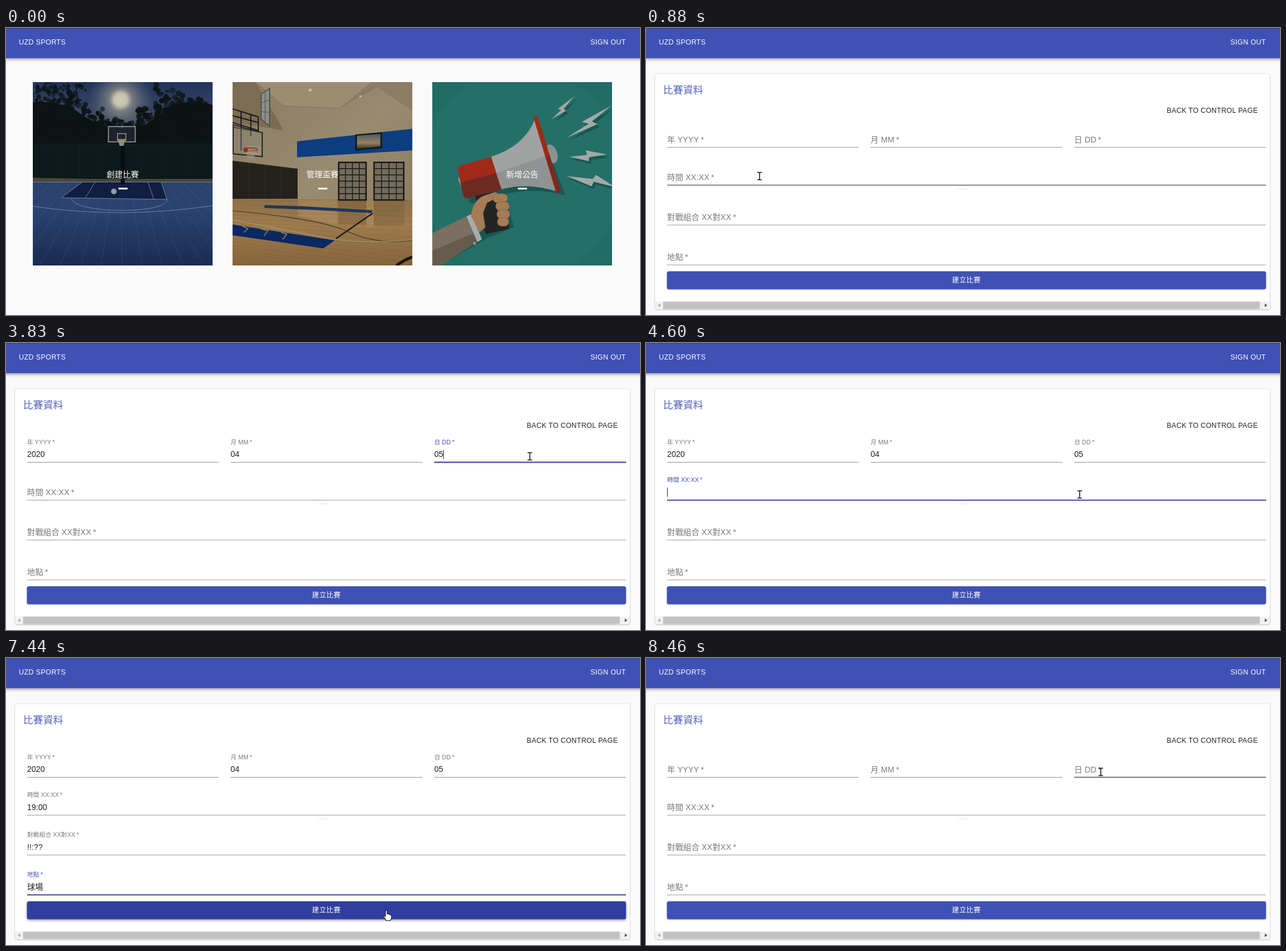
Recreate the animation shown at these times as an HTML page. Size 1111 by 504 pixels, loop 8530 ms.

```html
<!DOCTYPE html>
<html lang="zh-Hant">
<head>
<meta charset="utf-8">
<title>Match form</title>
<style>
html, body { margin: 0; width: 100%; height: 100%; overflow: hidden; background: #fafafa; }
svg { display: block; width: 1111px; height: 504px; }
text { font-family: "Liberation Sans", "Noto Sans CJK TC", "Noto Sans CJK JP", "Noto Sans CJK", sans-serif; font-weight: 300; }
.btn { font-size: 12.25px; letter-spacing: .35px; }
.bar { filter: drop-shadow(0 2px 2px rgba(0,0,0,.28)) drop-shadow(0 1px 4px rgba(0,0,0,.14)); }
.paper { filter: drop-shadow(0 1px 1px rgba(0,0,0,.2)) drop-shadow(0 0 1px rgba(0,0,0,.14)); }
.cap { font-size: 14px; letter-spacing: .13px; fill: #fff; text-anchor: middle; }
</style>
</head>
<body>
<svg viewBox="0 0 1111 504" xmlns="http://www.w3.org/2000/svg">
<defs>
  <clipPath id="c0"><rect x="47" y="95" width="315" height="322"/></clipPath>
  <clipPath id="c1"><rect x="397" y="95" width="315" height="322"/></clipPath>
  <clipPath id="c2"><rect x="747" y="95" width="315" height="322"/></clipPath>
  <linearGradient id="sky" x2="0" y2="1"><stop stop-color="#21345a"/><stop offset=".6" stop-color="#4d586b"/><stop offset="1" stop-color="#3b4149"/></linearGradient>
  <radialGradient id="sun"><stop stop-color="#cfccbb"/><stop offset=".2" stop-color="#c3c0ac"/><stop offset=".36" stop-color="#8a8c88" stop-opacity=".75"/><stop offset="1" stop-color="#566378" stop-opacity="0"/></radialGradient>
  <linearGradient id="court" x2="0" y2="1"><stop stop-color="#2b426c"/><stop offset=".35" stop-color="#2a4271"/><stop offset="1" stop-color="#1a2b52"/></linearGradient>
  <linearGradient id="wall" x2="1" y2="1"><stop stop-color="#887a60"/><stop offset=".5" stop-color="#998b70"/><stop offset="1" stop-color="#85775d"/></linearGradient>
  <linearGradient id="wood" x2="0" y2="1"><stop stop-color="#8f7148"/><stop offset=".4" stop-color="#9c7b4e"/><stop offset="1" stop-color="#85653a"/></linearGradient>
  <linearGradient id="dusk" x2="0" y2="1"><stop stop-color="#4d5a66"/><stop offset=".6" stop-color="#94815f"/><stop offset="1" stop-color="#3c352c"/></linearGradient>
  <g id="bolts">
    <path d="M996 120L967 142L973 144L956 160L982 145L977 142Z"/>
    <path d="M1061 136L1009 165L1021 168L982 193L1036 169L1027 164Z"/>
    <path d="M1053 222L1016 215L1018 223L988 226L1021 234L1022 227Z"/>
    <path d="M983 260L1026 278L1030 270L1062 278V276L1034 258L1028 265Z"/>
  </g>
</defs>
<rect width="1111" height="504" fill="#fafafa"/>

<g id="home">
  <g clip-path="url(#c0)"><g class="pic">
    <rect x="47" y="95" width="315" height="175" fill="url(#sky)"/>
    <circle cx="201" cy="126" r="58" fill="url(#sun)"/>
    <path d="M47 130Q100 128 130 150T201 176T270 150T362 135V210H47Z" fill="#0e1315"/>
    <g id="trees" fill="#0e1315"></g>
    <rect x="47" y="204" width="315" height="62" fill="#0b1a1b"/>
    <path d="M47 204H362M88 204V265M129 204V265M170 204V265M238 204V265M280 204V265M321 204V265" stroke="#102425" fill="none"/>
    <path d="M47 263L150 265H362V270H47Z" fill="#4e4630"/>
    <rect x="47" y="269" width="315" height="148" fill="url(#court)"/>
    <g id="tiles" stroke="#7c8db0" stroke-opacity=".17"></g>
    <path d="M133 271H272L282 301L97 298Z" fill="#101e42"/>
    <g fill="none" stroke="#78849f" stroke-width="1">
      <path d="M47 270.500H362M133 271L97 298L282 301L272 271M156 271L139 298M249 271L259 301"/>
      <path d="M115 299C116 326 282 328 282 301"/>
      <path d="M47 313Q200 336 362 312"/>
    </g>
    <circle cx="189" cy="287" r="5" fill="#9299ab"/>
    <path d="M201 205H208V274H201Z" fill="#080d12"/>
    <rect x="179.500" y="173" width="47" height="27" fill="#3a4456" fill-opacity=".35" stroke="#9b9d9f" stroke-width="1.600"/>
    <rect x="195.500" y="185.500" width="14.500" height="12" fill="none" stroke="#a5a6a6" stroke-width="1.300"/>
    <path d="M196 196H209L206 207H199Z" fill="#8e8d84"/><path d="M196 195.500H209" stroke="#a77440" stroke-width="1.500"/>
  </g></g>

  <g clip-path="url(#c1)"><g class="pic">
    <rect x="397" y="95" width="315" height="322" fill="url(#wall)"/>
    <path d="M397 95H437L487 180L397 165Z" fill="#7b6d54"/>
    <path d="M437 95H712V132L650 104L584 141L487 137Z" fill="#9b8d71"/>
    <path d="M584 141L640 95H712V145L650 104Z" fill="#8b7d63"/>
    <path d="M437 95L487 137L584 141L650 100" fill="none" stroke="#807259"/>
    <circle cx="533" cy="109" r="2.500" fill="#d0c4a4"/><circle cx="621" cy="120" r="2" fill="#c9bc9b"/>
    <path d="M447 116L462 106V172L447 160Z" fill="#85908f" stroke="#5c503d" stroke-width="2"/><path d="M454 111V166M447 132L462 126M447 147L462 148" stroke="#5c503d"/>
    <path d="M510 199L712 177V215L510 227Z" fill="#0b3d80"/>
    <path d="M612 187L659 183V211L612 215Z" fill="#15191c"/><path d="M615 189L656 186V208L615 212Z" fill="url(#dusk)"/>
    <path d="M397 233L511 247V300H397Z" fill="#25211d"/>
    <path d="M425 237V300M453 240V300M482 244V300" stroke="#332e29"/>
    <path d="M397 142L442 156V182L397 174M397 154L442 166M397 166L442 180M412 147V215M429 152V190" fill="none" stroke="#17191c" stroke-width="2"/>
    <path d="M398 170L449 184V226L398 221Z" fill="#8a8878" fill-opacity=".4" stroke="#1b1d20" stroke-width="1.800"/>
    <path d="M424 207L444 209V222L424 219Z" fill="none" stroke="#a9a498"/><ellipse cx="429" cy="213.500" rx="12" ry="3" fill="none" stroke="#a83b20" stroke-width="1.800"/><path d="M418 215L439 216L434 229H424Z" fill="#a39a82" opacity=".6"/><circle cx="420" cy="214" r="4" fill="#9e2d1c"/>
    <path d="M397 300L712 302V417H397Z" fill="url(#wood)"/>
    <g id="doors"></g>
    <path d="M512 302H580V346L512 330ZM632 302H644V350H632Z" fill="#c3a779" opacity=".3"/>
    <path d="M583 303H631V345H583ZM645 303H698V347H645Z" fill="#5b482f" opacity=".22"/>
    <g id="planks" stroke="#5d4423" stroke-opacity=".2" stroke-width=".7"></g>
    <path d="M453 311L520 313L643 320L640 325L530 319L453 316Z" fill="#20365a"/>
    <path d="M397 345L576 373L556 387L397 364Z" fill="#0a2862"/>
    <path d="M414 348L424 352L417 359M447 353L459 356L452 365M482 359L492 362L485 371" fill="none" stroke="#94855b" stroke-width="1.500"/>
    <path d="M578 370L643 325" stroke="#1c1b1a" stroke-width="2.500"/>
    <path d="M397 321Q550 335 600 358T712 373" fill="none" stroke="#3a3023" stroke-width="1.200"/>
    <path d="M397 337L575 371Q632 379 712 372" fill="none" stroke="#a99a78" stroke-width="1.200"/>
    <path d="M684 417Q698 407 712 402" fill="none" stroke="#171512" stroke-width="5"/>
  </g></g>

  <g clip-path="url(#c2)"><g class="pic">
    <rect x="747" y="95" width="315" height="322" fill="#216c65"/>
    <circle cx="905" cy="256" r="181" fill="#246f68"/>
    <path d="M800 252L858 235Q918 216 934 170L980 294Q925 279 874 292L890 350L842 370L760 417H747V395L830 340L834 306L812 308Z" fill="#1a5751"/>
    <use href="#bolts" fill="#1a5751" transform="translate(4 5)"/>
    <use href="#bolts" fill="#a3a9a8"/>
    <ellipse cx="956" cy="221" rx="10" ry="17" transform="rotate(-18 956 221)" fill="#8b9292"/>
    <path d="M796 262L792 265L797 277L801 275Z" fill="#909797"/>
    <path d="M850 226Q908 208 927 160L966 287Q914 271 868 283Z" fill="#a0a2a2"/>
    <path d="M858 255L948 224L966 287Q914 271 868 283Z" fill="#909293"/>
    <path d="M924 156Q928 152 932 156L972 286Q970 291 964 289Z" fill="#a02918"/>
    <path d="M952 222L972 286Q970 291 964 289L946 227Z" fill="#7c2a1f"/>
    <path d="M795 242L850 226L868 283L809 299Q803 299 800 290L792 248Q792 243 795 242Z" fill="#a02918"/>
    <path d="M797 271L858 255L868 283L809 299Q803 299 801 293Z" fill="#6c2a21"/>
    <path d="M822 295L858 287L882 346Q883 352 877 354L840 362Z" fill="#232524"/>
    <path d="M747 360L808 330L832 371L762 417H747Z" fill="#7a6f60"/>
    <path d="M747 391L825 358L832 371L762 417H747Z" fill="#665c4e"/>
    <path d="M807 331L815 327L834 371L826 376Z" fill="#a8acac"/>
    <path d="M815 330Q818 304 836 295L857 288Q866 291 859 299L843 307L836 325L840 350L829 359Z" fill="#a57c56"/>
    <g fill="#a57c56" stroke="#7d5b3c" stroke-width=".6"><rect x="853" y="291" width="26" height="16" rx="8"/><rect x="858" y="305" width="24" height="16" rx="8"/><rect x="860" y="319" width="23" height="16" rx="8"/><rect x="861" y="333" width="20" height="15" rx="7"/></g>
    <circle cx="821" cy="378" r="3.500" fill="#8c8e88" stroke="#4a4a42"/>
  </g></g>
  <g id="caps"></g>
</g>

<g id="form">
  <rect class="paper" x="16" y="81" width="1077" height="413" rx="3.500" fill="#fff"/>
  <text x="30" y="114.500" font-size="17.5" fill="#5261b9">比賽資料</text>
  <text class="btn" x="912.500" y="149.400" fill="#212121">BACK TO CONTROL PAGE</text>
  <rect x="547" y="281" width="16" height="3" fill="#f4f4f4"/>
  <g id="fields"></g>
  <rect id="go" x="36.700" y="427.200" width="1049.800" height="31.600" rx="3.500"/>
  <text class="btn" x="561.500" y="447" fill="#fff" text-anchor="middle">建立比賽</text>
  <rect x="16" y="480.500" width="1077" height="13" fill="#f1f1f1"/>
  <rect x="30" y="480.500" width="1045.500" height="13" fill="#c1c1c1"/>
  <path d="M25 484V490L21 487Z" fill="#a3a3a3"/><path d="M1084.500 484V490L1088.500 487Z" fill="#404040"/>
</g>

<g class="bar"><rect x="-12" y="-3" width="1135" height="56" fill="#3f51b5"/></g>
<rect width="1111" height="1" fill="#313f8e"/>
<text class="btn" x="22.500" y="29.200" fill="#fff">UZD SPORTS</text>
<text class="btn" x="1024.300" y="29.200" fill="#fff">SIGN OUT</text>

<g id="mouse">
  <path d="M-4 -6.500H-1L0 -5.500L1 -6.500H4M0 -5.500V5.500M-4 6.500H-1L0 5.500L1 6.500H4" fill="none" stroke="#111" stroke-width="1.500"/>
  <path d="M-3 -8Q-1.500 -10 0 -8V-2.500Q2 -3.500 3 -1.800Q5 -2.600 5.500 -.800Q7.500 -1 7.500 1V4Q7 7 5.500 9H-2Q-3 6 -6 2.500Q-6.500 0 -4.500 .800L-3 2Z" fill="#fff" stroke="#111" stroke-width="1.100"/>
  <path d="M0 0V15L3.500 11.800L6 17.500L8.300 16.500L5.900 11H10.500Z" fill="#fff" stroke="#111"/>
</g>
</svg>
<script>
const LOOP = 8530, OPEN = 820, SUBMIT = 7440, RESET = 8000;
const BLUE = '#3f51b5';
const $ = id => document.getElementById(id);
const clamp = v => Math.max(0, Math.min(1, v));
const ease = v => 1 - Math.pow(1 - clamp(v), 3);
const smooth = v => v * v * (3 - 2 * v);
const mix = (a, b, v) => a + (b - a) * v;

function add(parent, tag, attrs, text) {
  const el = document.createElementNS('http://www.w3.org/2000/svg', tag);
  set(el, attrs);
  if (text) el.textContent = text;
  return parent.appendChild(el);
}
function set(el, attrs) {
  for (const k in attrs) el.setAttribute(k, attrs[k]);
}

let seed = 7;
const rnd = () => (seed = seed * 16807 % 2147483647) / 2147483647;

function scenery() {
  // foliage: small leaf clumps, thinning out towards the sun and the top
  for (let i = 0; i < 1000; i++) {
    const x = 47 + rnd() * 315;
    const off = Math.abs(x - 201);
    const top = off < 30 ? 160 : off < 60 ? 140 : x < 201 ? 95 : Math.min(150, 98 + (off - 60) * .35);
    const y = mix(top, 200, Math.pow(rnd(), .8));
    add($('trees'), 'circle', { cx: x.toFixed(1), cy: y.toFixed(1), r: (1 + rnd() * 4.5).toFixed(1),
      opacity: (.5 + rnd() * .5).toFixed(2) });
  }
  for (let i = -14; i <= 14; i++)
    add($('tiles'), 'line', { x1: 203 + i * 15, y1: 270, x2: 203 + i * 36, y2: 417 });
  for (let i = 0; i < 20; i++)
    add($('planks'), 'line', { x1: 397, y1: 304 + i * 6, x2: 712, y2: 304 + i * 9 });
  for (const [x, w] of [[583, 48], [645, 52]]) {
    add($('doors'), 'rect', { x, y: 236, width: w, height: 66, fill: '#736c5b', stroke: '#191613', 'stroke-width': 2.5 });
    for (let i = 1; i < 4; i++)
      add($('doors'), 'rect', { x: x + i * w / 4 - .8, y: 236, width: 1.6, height: 66, fill: '#25211c' });
    for (let i = 1; i < 6; i++)
      add($('doors'), 'rect', { x, y: 235 + i * 11, width: w, height: 1.8, fill: '#25211c' });
  }
}

const pics = document.querySelectorAll('.pic');
const cards = ['創建比賽', '管理盃賽', '新增公告'].map((name, i) => {
  const x = 47 + i * 350;
  add($('caps'), 'text', { class: 'cap', x: x + 157.7, y: 261.5 }, name);
  const mark = add($('caps'), 'rect', { x: x + 150, y: 280.5, width: 16, height: 3, fill: '#fff' });
  return { pic: pics[i], mark, hit: p => p.x > x && p.x < x + 315 && p.y > 95 && p.y < 417 };
});

// focus: [from, to]; keys: [time, value]; off: caret pauses
const fields = [
  { x: 37, w: 336, y: 209, label: '年 YYYY', focus: [1160, 1690], keys: [[1330, '2'], [1400, '20'], [1470, '202'], [1540, '2020']] },
  { x: 393.5, w: 336, y: 209, label: '月 MM', focus: [1690, 2440], keys: [[2020, '04']] },
  { x: 750.5, w: 336, y: 209, label: '日 DD', focus: [2440, 4390], keys: [[3130, '0'], [3280, '05']] },
  { x: 37, w: 1049.5, y: 275.5, label: '時間 XX:XX', focus: [4390, 5070], keys: [[5070, '19:00']], off: [[4910, 5070]] },
  { x: 37, w: 1049.5, y: 345.5, label: '對戰組合 XX對XX', focus: [5070, 5850], rise: 90,
    keys: [[5460, '!!'], [5540, '!!:'], [5610, '!!:?'], [5690, '!!:??']] },
  { x: 37, w: 1049.5, y: 415.5, label: '地點', focus: [5850, SUBMIT + 10], rise: 90, keys: [[6000, '球場']],
    off: [[6150, 6630], [7130, SUBMIT + 10]] }
];
for (const f of fields) {
  const g = $('fields');
  f.line = add(g, 'rect', { x: f.x, width: f.w });
  f.under = add(g, 'rect', { y: f.y - .5, height: 2, fill: BLUE });
  f.tag = add(g, 'text', { y: 12, 'font-size': 14, 'letter-spacing': .13 }, f.label + '\u2009*');
  f.text = add(g, 'text', { x: f.x, y: f.y - 9, 'font-size': 14, fill: '#212121' });
  f.caret = add(g, 'rect', { y: Math.floor(f.y) - 21, width: 1, height: 16, fill: '#212121' });
  f.hit = p => p.x > f.x && p.x < f.x + f.w && p.y > f.y - 26 && p.y < f.y + 1;
}
const overGo = p => p.x > 37 && p.x < 1086 && p.y > 427 && p.y < 459;

const path = [
  [130, 990, 512], [660, 199, 258], [880, 199, 260], [1120, 205, 198], [1540, 205, 198], [1690, 412, 198],
  [2190, 412, 198], [2430, 918, 199], [3830, 918, 199], [4380, 760, 266], [5070, 760, 266], [5160, 752, 335],
  [5600, 752, 335], [5760, 739, 391], [5850, 736, 402], [6380, 736, 402], [6900, 668, 452], [7500, 668, 452],
  [7830, 772, 130], [8120, 772, 130], [8460, 797, 200], [LOOP, 797, 200]
];
function pointer(t) {
  let i = 1;
  while (i < path.length - 1 && t > path[i][0]) i++;
  const [t0, x0, y0] = path[i - 1], [t1, x1, y1] = path[i];
  let v = clamp((t - t0) / (t1 - t0));
  if (i > 1) v = smooth(v);
  return { x: mix(x0, x1, v), y: mix(y0, y1, v) };
}

// share of the last `span` ms spent inside, standing in for a CSS transition
function hover(hit, t, start, span) {
  let n = 0;
  for (let i = 0; i < 10; i++) {
    const u = t - i * span / 10;
    if (u >= start && hit(pointer(u))) n++;
  }
  return n / 10;
}

function drawField(f, t, p) {
  const [from, to] = f.focus;
  const focused = t >= from && t < to;
  const up = t < RESET ? ease((t - from) / (f.rise || 200)) : 1 - ease((t - RESET) / 200);
  const busy = t >= SUBMIT && t < RESET;
  const over = !busy && f.hit(p);
  const warm = over ? hover(f.hit, t, t >= RESET ? RESET : OPEN, 200) : 0;
  set(f.line, { y: over ? f.y - .3 : f.y, height: over ? 1.5 : 1, fill: `rgba(0,0,0,${mix(.42, .87, warm)})` });
  const grow = focused ? ease((t - from) / (f.rise || 200)) : 0;
  set(f.under, { x: f.x + f.w * (1 - grow) / 2, width: f.w * grow });
  set(f.tag, {
    transform: `translate(${f.x} ${f.y - 41.5 + mix(21, 1.3, up)}) scale(${mix(1, .75, up)})`,
    fill: focused ? BLUE : '#7a7a7a'
  });
  let value = '';
  if (t < RESET) for (const [at, s] of f.keys) if (t >= at) value = s;
  if (f.text.textContent !== value) f.text.textContent = value;
  const blink = (f.off || []).some(([a, b]) => t >= a && t < b);
  const show = focused && !blink;
  f.caret.style.display = show ? '' : 'none';
  if (show) f.caret.setAttribute('x', Math.round(f.x - .4 + (value ? f.text.getComputedTextLength() : 0)));
}

function draw(t) {
  const p = pointer(t), home = t < OPEN;
  $('home').style.display = home ? '' : 'none';
  $('form').style.display = home ? 'none' : '';
  if (home) {
    for (const c of cards) {
      const h = hover(c.hit, t, 130, 300);
      c.pic.style.filter = h ? `brightness(${1 + h * .417})` : 'none';
      c.mark.setAttribute('opacity', 1 - h);
    }
  } else {
    fields.forEach(f => drawField(f, t, p));
    const h = hover(overGo, t, OPEN, 250);
    const tone = [[63, 48], [81, 63], [181, 159]].map(([a, b]) => Math.round(mix(a, b, h)));
    $('go').setAttribute('fill', `rgb(${tone})`);
    $('go').style.filter = `drop-shadow(0 ${1.5 + h / 2}px ${1.3 + h}px rgba(0,0,0,${.3 + h * .12}))`;
  }
  const busy = t >= SUBMIT + 60 && t < RESET;
  let kind = 2;
  if (home) kind = cards.some(c => c.hit(p)) ? 1 : 2;
  else if (overGo(p)) kind = 1;
  else if (!busy && fields.some(f => f.hit(p))) kind = 0;
  const mouse = $('mouse');
  mouse.style.display = t < 130 ? 'none' : '';
  mouse.setAttribute('transform', `translate(${p.x} ${p.y})`);
  [...mouse.children].forEach((el, i) => el.style.display = i === kind ? '' : 'none');
}

scenery();
const start = performance.now();
function tick() {
  draw((performance.now() - start) % LOOP);
  requestAnimationFrame(tick);
}
tick();
</script>
</body>
</html>
```
